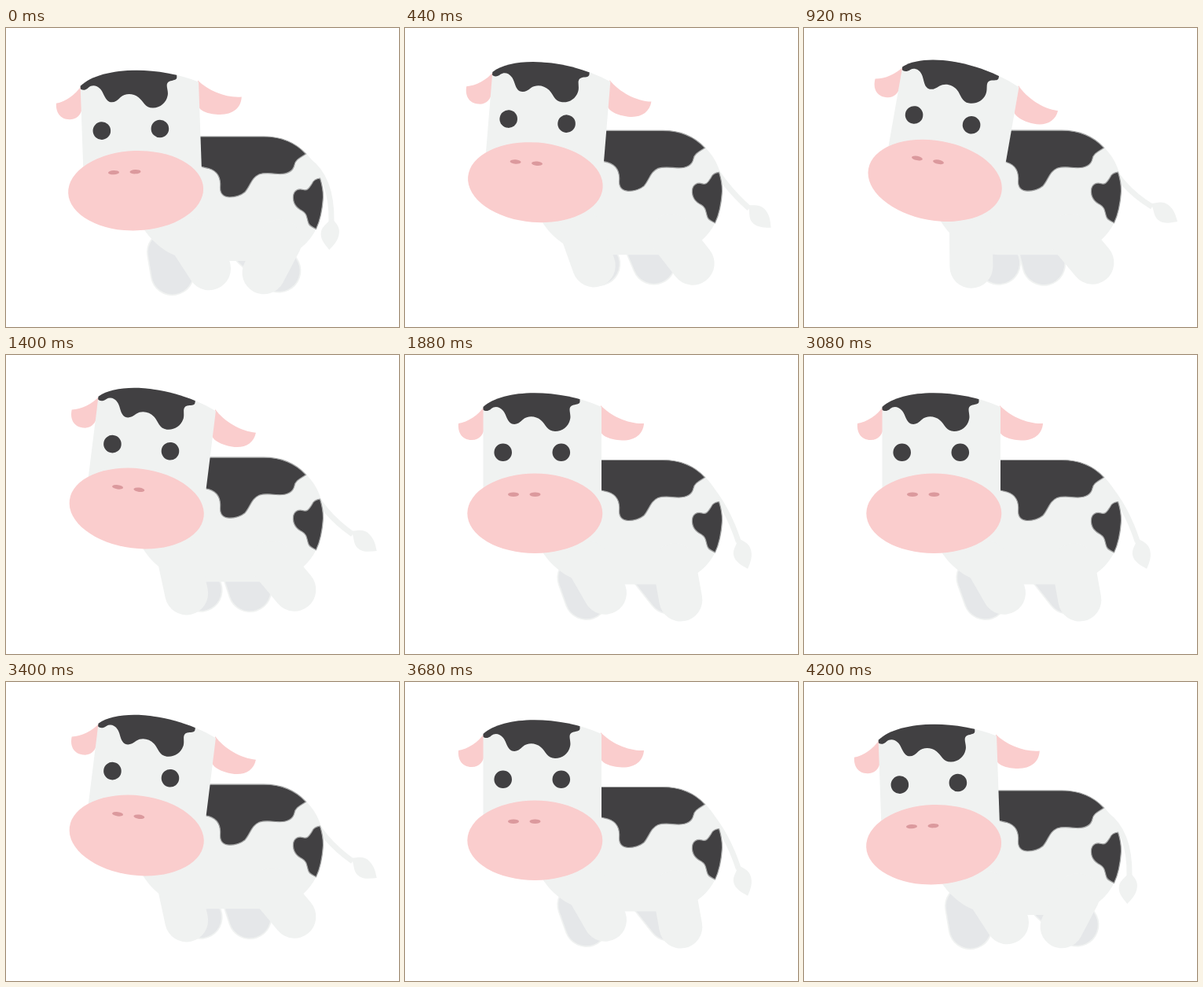
Recreate the animation shown at these times as an HTML page. Size 500 by 380 pixels, loop 4240 ms.

```html
<!DOCTYPE html>
<html lang="en">
<head>
<meta charset="utf-8">
<title>Walking cow</title>
<style>
  html, body { margin: 0; width: 100%; height: 100%; overflow: hidden; background: #fff; }
  svg { display: block; width: 500px; height: 380px; }
  .skin { fill: #f0f2f1; }
  .dark { fill: #414042; }
  .patch { stroke: #a3a4a4; stroke-width: 1.2; }
  .pink { fill: #facdcd; }
  .nose { fill: #db999d; }
  .limb, .rim, .shade { stroke: #f0f2f1; stroke-width: 55; stroke-linecap: round; }
  .rim { stroke-width: 56; }
  .shade { stroke: #e5e7e9; stroke-width: 52.5; }
  #tail { fill: none; stroke: #f0f2f1; stroke-width: 7; }
</style>
</head>
<body>
<svg viewBox="0 0 500 380">
  <defs>
    <clipPath id="skull"><path d="M99.5 66C125 43 195 42 250 66V200H99.5Z"/></clipPath>
  </defs>
  <g id="cow">
    <path id="tail"/>
    <path id="tuft" class="skin" d="M0 -2C5 4 12 8 11 18C10 28 4 34 0 39C-6 33 -13 26 -12 17C-11 9 -4 6 0 -2Z"/>

    <g id="farFront"><line class="rim" y2="27.5"/><line class="shade" y2="27.5"/></g>
    <g id="farBack"><line class="rim" y2="45"/><line class="shade" y2="45"/></g>

    <path class="skin" d="M170 137.5H328C352 137.5 370 147 382 159.5C397 175 404 193 404 215C404 262 372 296 325 296H250C215 296 188 278 172 250Z"/>

    <g id="nearFront"><line class="limb" y2="45"/></g>
    <g id="nearBack"><line class="limb" y2="45"/></g>

    <path class="dark patch" d="M235 138H328C352 138 370 147.5 381.5 160C376 164 368 167 367 174C365 183 356 186 346 185.5C337 185 330 183.5 322 186C312 190.5 311 200.5 304 208.5C298 213.5 290 215 284 215C275.5 214.5 272.5 209.5 272.5 203C273.5 192 270 182 258 178.5C254 178 251 176 235 174Z"/>
    <path class="dark patch" d="M399.5 191C402.5 200 403.5 210 403.5 215C402.5 230 399.5 245 394.5 255.5C389 252.5 385.5 251.5 384.5 247C382.5 241 383 236 377 232.5C369 228.5 364.5 223 365.5 213C366.5 206.5 372 203.5 378 205.5C384 207.5 386.5 202 389.5 197.5C391.5 192.5 396 191.5 399.5 191Z"/>

    <g id="head">
      <path class="pink" d="M101 65C93 77 80 85 68 87C67 98 72 108 85 108C95 108 100 101 101 92Z"/>
      <path class="pink" d="M249 64C262 78 285 88 304 87C303 101 292 109 276 108.5C262 108 250 103 249 97Z"/>
      <path class="skin" d="M99.5 66C125 43 195 42 250 66V200H99.5Z"/>
      <path class="dark" clip-path="url(#skull)" d="M95 40H222.5V59.5C222 63 217 62.5 213 64C206 67 212 75 210 82C208 91 200 97 191 97C181 97 179 88 173 83C166 77 156 77 150 82C145 87 141 89 136 87.5C130 85 129 76 125 71C120 65 114 65 110 68C106 72 101 72 99 69Z"/>
      <circle class="dark" cx="124.7" cy="123.8" r="11.3"/>
      <circle class="dark" cx="198.8" cy="123.8" r="11.3"/>
      <ellipse class="pink" cx="165.3" cy="201.3" rx="86" ry="50.7"/>
      <ellipse class="nose" cx="138" cy="177.3" rx="7" ry="2.7"/>
      <ellipse class="nose" cx="165.5" cy="177.3" rx="7" ry="2.7"/>
    </g>
  </g>
</svg>
<script>
  const LOOP = 4240, STEP = 40, STRIDE = 600;

  // Hip path, swing angles (degrees towards the tail), easing bias, vertical bow of the hip.
  const legs = {
    nearFront: { from: [234, 268], to: [212, 266], swing: [33, 0], bias: -0.3, bow: 0 },
    nearBack: { from: [349, 271], to: [338, 271.5], swing: [-27.8, 40], bias: 1.15, bow: 0 },
    farFront: { from: [207, 285], to: [234.5, 282.5], swing: [9.5, 29], bias: 1.05, bow: 4 },
    farBack: { from: [314, 278.4], to: [294, 264], swing: [48, 14], bias: 0.4, bow: -4 }
  };

  const part = id => document.getElementById(id);
  const mix = (a, b, e) => a + (b - a) * e;
  const place = (id, value) => part(id).setAttribute('transform', value);

  // There-and-back easing; a positive bias leaves the start pose faster.
  const sway = (phase, bias) => (1 - Math.cos(phase + bias * Math.sin(phase))) / 2;

  function pose(ms) {
    const phase = 2 * Math.PI * (ms % STRIDE) / STRIDE;

    place('cow', `translate(0 ${-7.8 * sway(phase, 1.2)})`);
    place('head', `translate(0 4.5) rotate(${mix(-2, 10.1, sway(phase, 0))} 190 207)`);

    for (const [id, leg] of Object.entries(legs)) {
      const e = sway(phase, leg.bias);
      const x = mix(leg.from[0], leg.to[0], e);
      const y = mix(leg.from[1], leg.to[1], e) + leg.bow * 4 * e * (1 - e);
      place(id, `translate(${x} ${y}) rotate(${-mix(...leg.swing, e)})`);
    }

    const e = sway(phase, 0.6);
    const x = mix(414, 443, e), y = mix(243, 232, e);
    part('tail').setAttribute('d', `M384 168Q${mix(415, 400, e)} ${mix(190, 209, e)} ${x} ${y + 3}`);
    place('tuft', `translate(${x} ${y}) rotate(${mix(4, -56, e)})`);
  }

  const start = performance.now();
  function tick() {
    const ms = (performance.now() - start) % LOOP;
    pose(Math.floor(ms / STEP) * STEP);
    requestAnimationFrame(tick);
  }
  tick();
</script>
</body>
</html>
```
